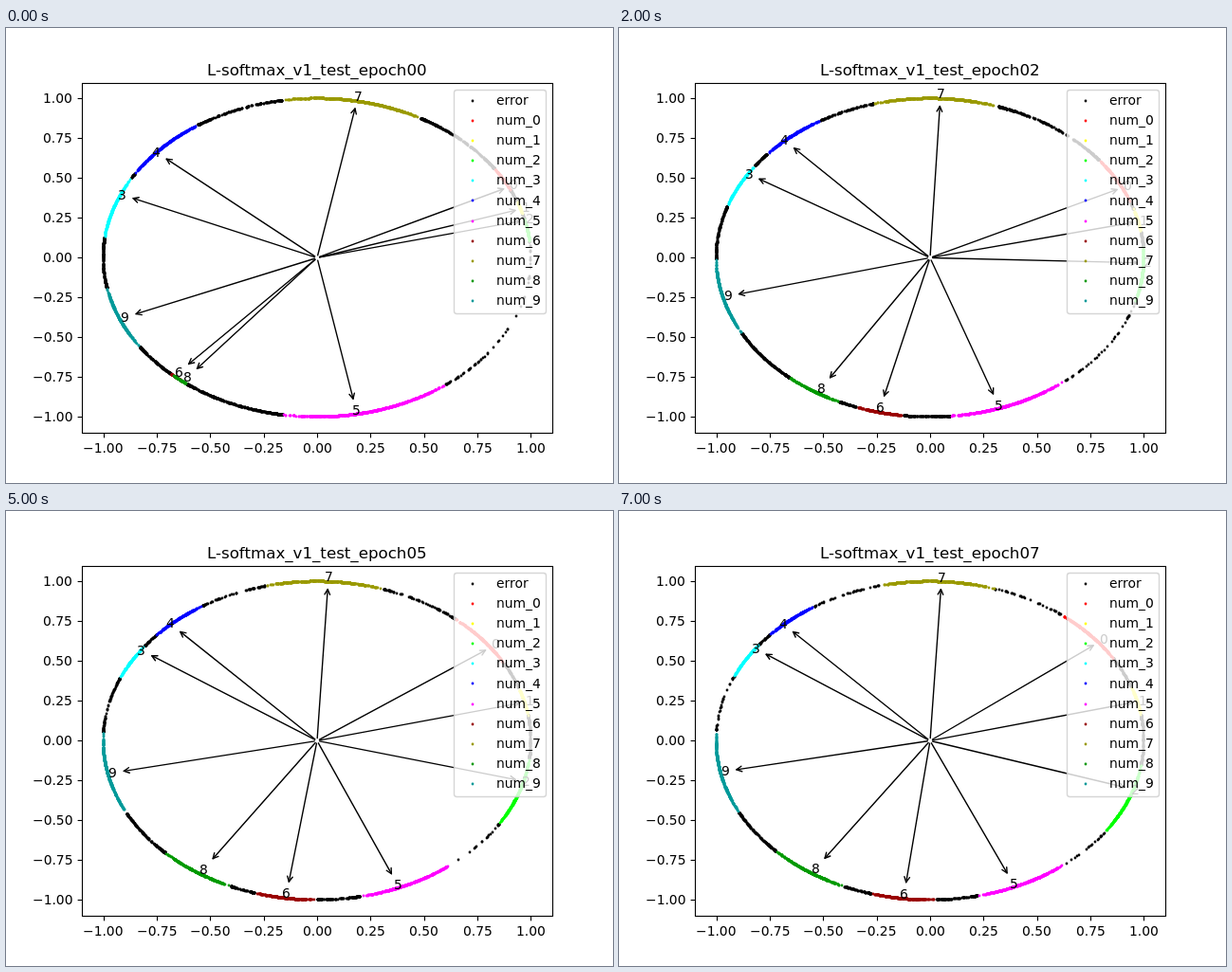
An HTML page with a canvas that plays this animation: 640x480 px, repeating every 8 s.

```html
<!DOCTYPE html>
<html lang="en">
<head>
<meta charset="utf-8">
<title>Embedding directions per epoch</title>
<style>
html, body { margin: 0; width: 100%; height: 100%; overflow: hidden; background: #fff; }
canvas { display: block; }
</style>
</head>
<body>
<canvas id="plot" width="640" height="480"></canvas>
<script>
const ctx = document.getElementById('plot').getContext('2d');
const EPOCHS = 8, EPOCH_MS = 1000;
const CX = 328, CY = 242.4, RX = 225.45, RY = 168;
const PT = 100 / 72;

// Angles in degrees. aim: direction early, at the turn and late; skew: arc centre
// relative to the aim; spread: half width of the arc, first and settled;
// stray: error dots per degree that follow the arc, first and last.
const TURN = 2;
const CLASSES = [
  { color: '#f00', aim: [25.5, 25.2, 37.6], skew: 4, spread: [4.5, 11], stray: [9, 1.8] },
  { color: '#ff0', aim: [16.7, 11.9, 13], skew: 1.5, spread: [2.5, 5.5] },
  { color: '#0f0', aim: [12.4, -3.4, -19.6], skew: -2.5, spread: [4.2, 13.5] },
  { color: '#0ff', aim: [158.4, 150.1, 146.6], skew: 3, spread: [11.5, 6.5], stray: [14, 2] },
  { color: '#00f', aim: [140.5, 134.6, 135], skew: -4.5, spread: [12.4, 7.8] },
  { color: '#f0f', aim: [279.4, 287.5, 291.8], skew: 4.5, spread: [23.2, 13], stray: [1.2, 1.2] },
  { color: '#900', aim: [228.2, 255.4, 261.9], skew: 1, spread: [2.2, 9.2] },
  { color: '#990', aim: [80.1, 88.3, 88], skew: 0, spread: [19.3, 15.8], stray: [7, 2] },
  { color: '#090', aim: [231.2, 238, 236.2], skew: -1, spread: [2.3, 11.6] },
  { color: '#099', aim: [203.6, 195.5, 192.6], skew: -1, spread: [11.7, 15.5] }
];

const lerp = (a, b, k) => a + (b - a) * k;
const easeOut = k => Math.sin(k * Math.PI / 2);

function aimAt([early, turn, late], epoch) {
  return epoch < TURN
    ? lerp(early, turn, easeOut(epoch / TURN))
    : lerp(turn, late, easeOut((epoch - TURN) / (EPOCHS - 1 - TURN)));
}

function seeded(seed) {
  let s = seed * 7919 + 17;
  return () => (s = (s * 16807) % 2147483647) / 2147483647;
}

function onRing(deg) {
  const a = deg * Math.PI / 180;
  return [CX + RX * Math.cos(a), CY - RY * Math.sin(a)];
}

// anchor: 0 left, 0.5 centre, 1 right
function text(str, x, y, anchor = 0, size = 10 * PT) {
  ctx.font = `${size}px "DejaVu Sans", sans-serif`;
  ctx.fillStyle = '#000';
  ctx.fillText(str, Math.round(x - ctx.measureText(str).width * anchor), Math.round(y));
}

function line(points, width) {
  ctx.beginPath();
  for (const [x, y] of points) ctx.lineTo(x, y);
  ctx.lineWidth = width;
  ctx.strokeStyle = '#000';
  ctx.stroke();
}

function dot(x, y, color) {
  ctx.fillStyle = color;
  ctx.beginPath();
  ctx.arc(Math.round(x), Math.round(y), PT, 0, 7);
  ctx.fill();
}

const bunchedAtEnds = u => 0.5 - 0.5 * Math.cos(Math.PI * u);
const thinAtEnds = u => 0.5 - Math.sin(Math.asin(1 - 2 * u) / 3);

function scatter(from, to, density, color, seed, distribute) {
  const random = seeded(seed);
  for (let n = Math.round((to - from) * density); n > 0; n--) {
    dot(...onRing(lerp(from, to, distribute(random()))), color);
  }
}

function drawRing(epoch) {
  const settled = 1 - Math.exp(-epoch / 2);
  const arcs = CLASSES.map(({ color, aim, skew, spread, stray = [14, 9] }) => {
    const middle = aimAt(aim, epoch) + skew;
    const half = lerp(...spread, settled);
    return { color, from: middle - half, to: middle + half, stray: lerp(...stray, epoch / (EPOCHS - 1)) };
  });
  const sorted = [...arcs].sort((a, b) => a.from - b.from);
  sorted.forEach(({ to, stray }, i) => {
    const next = i < 9 ? sorted[i + 1].from : sorted[0].from + 360;
    scatter(to, next, stray, '#000', epoch * 31 + i + 400, bunchedAtEnds);
  });
  arcs.forEach(({ color, from, to }, i) =>
    scatter(from, to, 12, color, epoch * 31 + i + 1, thinAtEnds));
}

// Arrow from the origin to the edge of the digit's padded box
function drawArrow(digit, deg) {
  const [x, y] = onRing(deg);
  const pad = 2 * PT;
  const dx = x + 4.4 - CX, dy = y - 4.5 - CY, length = Math.hypot(dx, dy);
  const clip = Math.min((4.4 + pad) / Math.abs(dx), (5.5 + pad) / Math.abs(dy));
  const tip = length * (1 - clip) - pad - 1.55;
  const ux = dx / length, uy = dy / length;
  const point = (along, side) => [CX + ux * along - uy * side, CY + uy * along + ux * side];
  line([point(pad, 0), point(tip, 0)], PT);
  line([point(tip - 4 * PT, 2 * PT), point(tip, 0), point(tip - 4 * PT, -2 * PT)], PT);
  text(digit, x, y);
}

function drawAxes() {
  ctx.lineCap = 'butt';
  ctx.lineJoin = 'miter';
  ctx.lineWidth = 1.11;
  ctx.strokeStyle = '#000';
  ctx.strokeRect(80.5, 58.5, 496, 369);
  for (let i = -4; i <= 4; i++) {
    const label = (i < 0 ? '\u2212' : '') + Math.abs(i / 4).toFixed(2);
    const x = CX + RX * i / 4, y = CY - RY * i / 4;
    const tickX = Math.round(x) + 0.5, tickY = Math.round(y) + 0.5;
    line([[tickX, 427.5], [tickX, 432.4]], 1.11);
    line([[80.5, tickY], [75.6, tickY]], 1.11);
    text(label, x, 448, 0.5);
    text(label, 70.3, y + 5, 1);
  }
}

function drawLegend() {
  ctx.beginPath();
  ctx.roundRect(472.5, 65.5, 97, 236, 2.8);
  ctx.fillStyle = 'rgba(255,255,255,.8)';
  ctx.fill();
  ctx.lineWidth = PT;
  ctx.strokeStyle = 'rgba(204,204,204,.8)';
  ctx.stroke();
  [{ color: '#000' }, ...CLASSES].forEach(({ color }, i) => {
    const y = 81 + 21.12 * i;
    dot(492, y - 4.2, color);
    text(i ? 'num_' + (i - 1) : 'error', 517, y);
  });
}

function draw(epoch) {
  ctx.fillStyle = '#fff';
  ctx.fillRect(0, 0, 640, 480);
  drawRing(epoch);
  drawAxes();
  ctx.lineCap = ctx.lineJoin = 'round';
  CLASSES.forEach(({ aim }, digit) => drawArrow(digit, aimAt(aim, epoch)));
  text('L-softmax_v1_test_epoch0' + epoch, CX, 50, 0.5, 12 * PT);
  drawLegend();
}

let shown = -1;
const start = performance.now();
function tick() {
  const epoch = Math.floor((performance.now() - start) / EPOCH_MS) % EPOCHS;
  if (epoch !== shown) draw(shown = epoch);
  requestAnimationFrame(tick);
}
tick();
</script>
</body>
</html>
```
